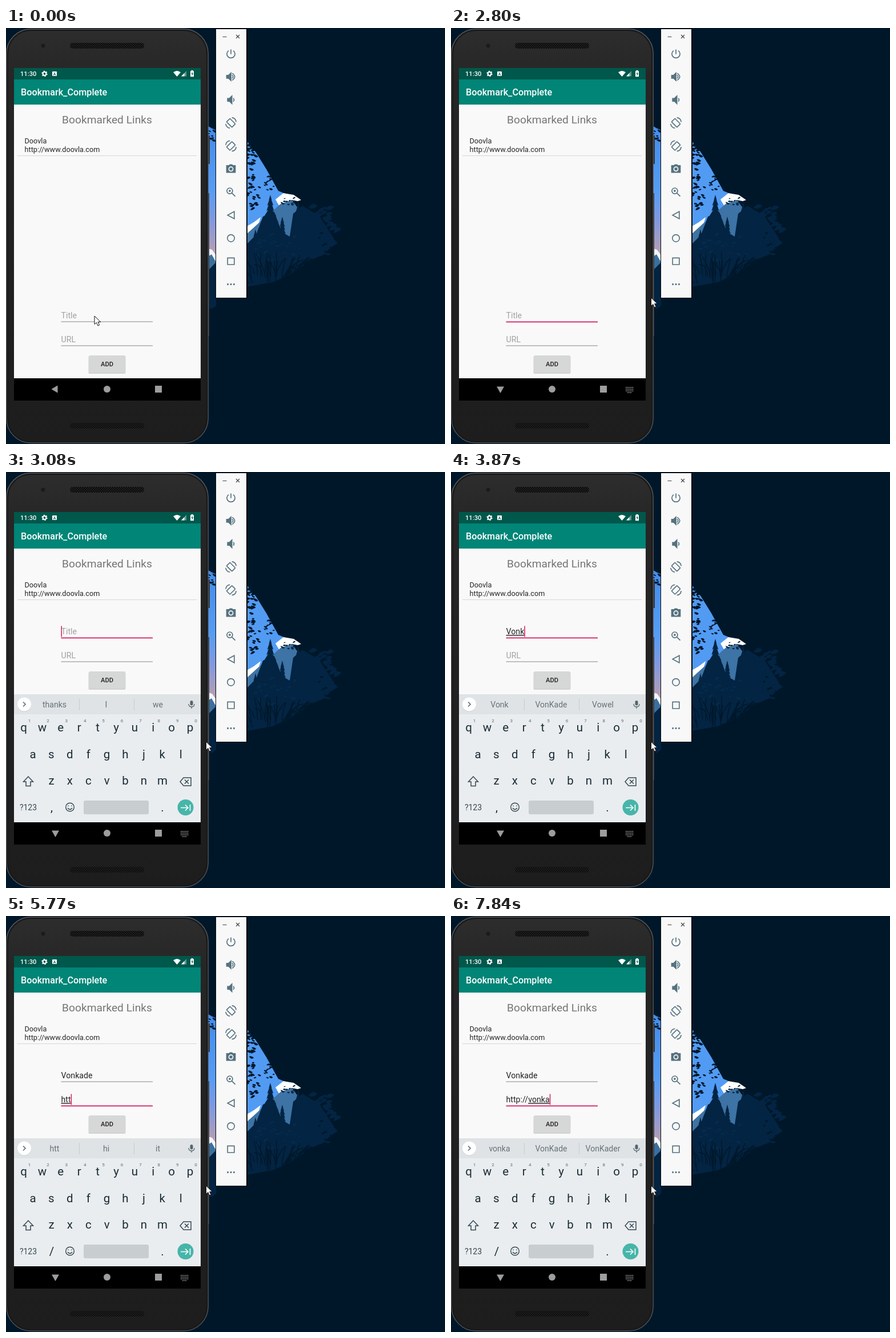
An HTML page for the animation above (7.99 s loop, 769 px wide and 728 px high).

```html
<!DOCTYPE html>
<html lang="en">
<head>
<meta charset="utf-8">
<title>Bookmark app demo</title>
<style>
  html, body { margin: 0; width: 100%; height: 100%; overflow: hidden; background: #00172a; }
  svg { display: block; width: 100vw; height: 100vh; }
  text { font-family: Roboto, "Noto Sans", sans-serif; white-space: pre; }
  .mid { text-anchor: middle; }
  .bold { font-weight: 500; }
  .field { font-size: 14.2px; }
  .under { text-decoration: underline; text-decoration-thickness: 1px; }
  .key { font-size: 20.5px; fill: #1c2b33; text-anchor: middle; }
  .digit { font-size: 8px; fill: #5d6a71; text-anchor: middle; }
  .word { font-size: 14px; fill: #677177; text-anchor: middle; }
  .line { fill: none; stroke: #56727f; stroke-width: 1.7; }
</style>
</head>
<body>
<svg viewBox="0 0 769 728" preserveAspectRatio="none">
  <defs>
    <linearGradient id="dusk" x2="0" y2="1">
      <stop offset="0" stop-color="#438ceb"/><stop offset=".5" stop-color="#579df5"/>
      <stop offset=".72" stop-color="#8199df"/><stop offset="1" stop-color="#bb9fae"/>
    </linearGradient>
    <linearGradient id="shell" x2="0" y2="1">
      <stop offset="0" stop-color="#2d2d2d"/><stop offset=".12" stop-color="#262626"/><stop offset="1" stop-color="#1d1d1d"/>
    </linearGradient>
    <pattern id="mesh" width="4" height="4" patternUnits="userSpaceOnUse">
      <path d="M0 0h2v2H0zM2 2h2v2H2z" fill="#0b0b0b"/>
    </pattern>
    <clipPath id="imeClip"><path d="M14 389h327v224H14z"/></clipPath>
  </defs>
  <rect width="769" height="728" fill="#00172a"/>
  <g id="scenery"></g>

  <!-- emulator toolbar -->
  <path d="M367 1h56v472h-56z" fill="#060a0e"/>
  <path d="M368 2h53v470h-53z" fill="#f8f8f8"/>
  <path class="line" style="stroke:#444;stroke-width:1.2" d="M379.500 15.500h7M403 12l6 6m0-6l-6 6"/>
  <g id="tools"></g>

  <!-- phone -->
  <path d="M353 188h4v50h-4zM353 289h3v250h-3z" fill="#343638"/>
  <rect x=".7" y="1.700" width="353.500" height="724.500" rx="43" fill="url(#shell)" stroke="#5a5c5e" stroke-width="1.200"/>
  <rect x="3" y="4" width="349" height="720" rx="41" fill="none" stroke="#191919" stroke-width="2"/>
  <circle cx="65" cy="31" r="3.500" fill="#1b1b1d"/>
  <g id="grills"></g>
  <path d="M14 70h327v20H14z" fill="#00574b"/>
  <path d="M14 90h327v44H14z" fill="#008577"/>
  <path d="M14 134h327v479H14z" fill="#f9f9f9"/>
  <path d="M14 613h327v39H14z"/>
  <g fill="#fff">
    <text class="bold" x="25" y="84" font-size="11.200">11:30</text>
    <circle cx="67.500" cy="80" r="2.900" fill="none" stroke="#fff" stroke-width="2"/>
    <circle cx="67.500" cy="80" r="4.500" fill="none" stroke="#fff" stroke-width="1.400" stroke-dasharray="2.300 2.410"/>
    <rect x="81" y="76" width="8" height="8" rx="1"/>
    <text class="mid bold" x="85" y="82.500" font-size="7" style="fill:#00574b">A</text>
    <path d="M293 77.500q6.500-5 13 0l-6.500 7.500z"/>
    <path d="M316 75v9.500h-9z" opacity=".4"/><path d="M312.500 79v5.500H307z"/>
    <path d="M324.500 74h3v1.200h1.500v10h-6v-10h1.500z"/>
    <path d="M326.500 76.500l-2 4h1.500v3l2-4h-1.500z" fill="#00574b"/>
    <text class="bold" x="26" y="118" font-size="16.200">Bookmark_Complete</text>
  </g>
  <text class="mid" x="177" y="167" font-size="19.200" fill="#757575">Bookmarked Links</text>
  <g font-size="12.700" fill="#252525">
    <text x="32.500" y="202">Doovla</text>
    <text x="32.500" y="217">http://www.doovla.com</text>
  </g>
  <path d="M20 223h314v1H20z" fill="#d6d6d6"/>

  <g id="form">
    <g id="fields"></g>
    <path id="caret" fill="#d81b60"/>
    <rect x="144.500" y="574" width="65" height="31" rx="2" fill="#bcbdbd" opacity=".65"/>
    <rect x="145" y="573" width="64" height="30" rx="2" fill="#d6d7d7"/>
    <text class="mid bold" x="177" y="592" font-size="11.200" fill="#202020">ADD</text>
  </g>

  <g clip-path="url(#imeClip)"><g id="ime">
    <path d="M14 389h327v224H14z" fill="#e9edf0"/>
    <path d="M14 389h327v35H14z" fill="#dfe3e6"/>
    <path d="M128 397h1v20h-1zM224 397h1v20h-1z" fill="#c6cbce"/>
    <circle cx="32" cy="407.500" r="12" fill="#cdd1d4"/>
    <circle cx="32" cy="406.500" r="12" fill="#fff"/>
    <path class="line" d="M30 402.500l4 4-4 4"/>
    <rect x="322.500" y="400" width="5" height="8.500" rx="2.500" fill="#56656c"/>
    <path class="line" style="stroke:#56656c;stroke-width:1.300" d="M320 406q0 5 5 5t5-5M325 411v3"/>
    <g id="keys"></g>
    <path id="shift" class="line" style="stroke:#37474f;stroke-width:1.500" d="M39 533l-8.500 9h4.500v7.500h8V542h4.500z"/>
    <path class="line" style="stroke:#37474f;stroke-width:1.500" d="M311 535h13v14h-13l-6-7zM313 538.500l7 7m0-7l-7 7"/>
    <text class="mid" x="39" y="592" font-size="14" fill="#37474f">?123</text>
    <g class="line" style="stroke:#37474f;stroke-width:1.400">
      <circle cx="112" cy="586.500" r="7.300"/><path d="M108 588q4 5 8 0M109 583.500v1.500M115 583.500v1.500"/>
    </g>
    <rect x="136" y="575" width="114" height="24" rx="3" fill="#c8cdd0"/>
    <circle cx="314.500" cy="587" r="14" fill="#47b5a9"/>
    <path d="M306 587.500h13m-5-5l5 5-5 5M322.500 582v11" fill="none" stroke="#fff" stroke-width="1.600"/>
  </g></g>

  <g fill="#9d9d9d">
    <path id="back"/>
    <circle cx="177" cy="632" r="6"/>
    <path d="M261 626h12v12h-12z"/>
    <path id="imeIcon" d="M306 629h14M306 632h14M306 635h14M309 638h8" stroke="#9d9d9d" stroke-width="1.700" stroke-dasharray="1.700 1"/>
  </g>
  <path id="mouse" d="M0 0v14.500l3.500-3 2.500 5.500 2.600-1.200-2.500-5.300h4.600z" fill="#fff" stroke="#111"/>
</svg>

<script>
const LOOP = 7990;
const $ = id => document.getElementById(id);

// seeded randomness for the wallpaper
let seed = 11;
const rnd = (a, b) => a + (b - a) * ((seed = seed * 16807 % 2147483647) / 2147483647);
const shape = (d, fill) => `<path d="${d}" fill="${fill}"/>`;

function leaves(n, cx, cy, rx, ry, size, fill) {
  let d = "";
  for (let i = 0; i < n; i++) {
    const a = rnd(0, 6.283), r = Math.sqrt(rnd(0, 1)), s = rnd(size / 2, size);
    const x = cx + rx * r * Math.cos(a), y = cy + ry * r * Math.sin(a), k = rnd(-s, s);
    d += `M${x - s} ${y}q${s} ${-s + k} ${2 * s} ${k}q${-s} ${s} ${-2 * s} ${-k}z`;
  }
  return shape(d, fill);
}

function pine(x, top, h, w, fill) {
  let left = "", right = "";
  for (let i = 1; i <= 9; i++) {
    const y = top + h * i / 9, r = w * i / 9 * rnd(.8, 1.1);
    right += `L${x + r} ${y}L${x + r * .55} ${y - 2}`;
    left = `L${x - r * .55} ${y - 2}L${x - r} ${y}` + left;
  }
  return shape(`M${x} ${top}${right}${left}z`, fill);
}

function grass() {
  let d = "";
  for (let i = 0; i < 45; i++) {
    const x = rnd(424, 515), lean = (x - 465) * .6 + rnd(-14, 14);
    d += `M${x} ${rnd(430, 448)}q${lean * .2} -22 ${lean} ${-rnd(20, 45)}`;
  }
  return `<path d="${d}" fill="none" stroke="#00172a" stroke-width="1.3"/>`;
}

const NIGHT = "#00172a", WOOD = "#032442";
$("scenery").innerHTML =
  shape("M354 172l14 7v221h-14z", "url(#dusk)") +
  shape("M422 198l16 20 18 29 21 38 24 10-20 25-41 25-18 12z", "#529bf3") +
  shape("M354 386l7 2 7 10v24l-14-6z", "#f4f6fa") +
  shape("M354 400l6-4 8 14v22h-14z", "#3b709f") +
  shape("M354 424l14-14v76l-8 6-6-4z", WOOD) +
  shape("M472 300l14-11 18 3 13 9-6 2-11-2-6 12-12 4z", "#fff") +
  shape("M422 347l12-7 12-9-3 10-9 10-12 13z", "#fff") +
  shape("M422 360l20-18 40-35 20-5 14 20 2 50-96 10z", "#3d73a5") +
  shape("M422 378l16-16 12-32 20-8 13 35 14 8 6-40 16-14 30 18 30 46-18 20-30 12-24 20-40 18-45 8z", WOOD) +
  leaves(55, 545, 355, 40, 46, 8, WOOD) +
  pine(463, 292, 85, 24, WOOD) + pine(437, 352, 60, 17, WOOD) +
  pine(512, 304, 80, 19, WOOD) + pine(484, 330, 55, 14, WOOD) +
  leaves(22, 478, 385, 45, 25, 6, "#052a4c") + grass() +
  leaves(24, 430, 222, 9, 24, 5, NIGHT) + leaves(30, 434, 285, 12, 38, 4.5, NIGHT) +
  leaves(14, 461, 275, 12, 18, 4, NIGHT) + leaves(14, 361, 183, 7, 15, 4, NIGHT) +
  leaves(14, 498, 303, 18, 7, 3, WOOD) + leaves(14, 565, 378, 24, 24, 5, NIGHT) +
  leaves(10, 361, 478, 6, 14, 4, WOOD);

// toolbar icons, each on a 24-unit grid
const speaker = "M3 9v6h4l5 5V4L7 9z";
const turned = `<rect x="7" y="4" width="10" height="16" rx="1" transform="rotate(-45 12 12)"/>
  <path d="M14 1q8 1 9 9M10 23q-8-1-9-9"/>`;
const icons = [
  `<path d="M12 3v10M7 5.500a8.500 8.500 0 1 0 10 0"/>`,
  `<path d="${speaker}" fill="#56727f"/><path d="M14.500 8.500q4 3.500 0 7M14.500 4.500q11 7.500 0 15"/>`,
  `<path d="${speaker}" fill="#56727f" transform="translate(2)"/><path d="M17 8.500q3 3.500 0 7"/>`,
  turned,
  `<g transform="matrix(-1 0 0 1 24 0)">${turned}</g>`,
  `<path d="M3 5h5l2-2h4l2 2h5v14H3z" fill="#56727f"/><circle cx="12" cy="12" r="4.300" style="stroke:#f8f8f8"/>`,
  `<circle cx="9.500" cy="9.500" r="6"/><path d="M14 14l7 7M9.500 7v5M7 9.500h5"/>`,
  `<path d="M19 4.500v15L5 12z"/>`,
  `<circle cx="12" cy="12" r="7.500"/>`,
  `<path d="M5 5h14v14H5z"/>`,
  `<path d="M4 12h3M10.500 12h3M17 12h3" stroke-width="3.500"/>`
];
$("tools").innerHTML = icons.map((icon, i) =>
  `<g class="line" style="stroke-width:2" transform="translate(384 ${35 + 40.35 * i}) scale(.835)">${icon}</g>`).join("");

$("grills").innerHTML = [26, 691].map(y =>
  `<rect x="112" y="${y}" width="130" height="10" rx="5" fill="#202020"/>
   <rect x="112" y="${y}" width="130" height="10" rx="5" fill="url(#mesh)"/>`).join("");

// form fields
const fields = [["Title", 508], ["URL", 550]].map(([hint, y]) => {
  $("fields").insertAdjacentHTML("beforeend",
    `<g><text class="field" x="96.500" y="${y}"><tspan></tspan><tspan class="under"></tspan></text><path/></g>`);
  const group = $("fields").lastChild, text = group.firstChild;
  return { hint, y, text, plain: text.firstChild, draft: text.lastChild, rule: group.lastChild };
});

// keyboard letters and suggestions
let keyMarkup = "";
["qwertyuiop", "asdfghjkl", "zxcvbnm"].forEach((row, r) => [...row].forEach((c, i) => {
  const x = [31, 47, 79.5][r] + 32.4 * i;
  keyMarkup += `<text class="key letter" x="${x}" y="${454 + 46.7 * r}">${c}</text>`;
  if (!r) keyMarkup += `<text class="digit" x="${x + 10}" y="438">${(i + 1) % 10}</text>`;
}));
keyMarkup += `<text class="key" id="slash" x="80" y="594"></text><text class="key" x="274" y="594">.</text>`;
keyMarkup += [85, 175.5, 266].map(x => `<text class="word" x="${x}" y="412"></text>`).join("");
$("keys").innerHTML = keyMarkup;
const letters = [...document.querySelectorAll(".letter")];
const words = [...document.querySelectorAll(".word")];

// each step changes part of the state; text is "finished|being composed"
const type = (key, text, hints) => ({ [key]: text, caret: true, ...(hints && { hints }) });
const steps = [
  [0, { mouse: [155, 504], focus: -1, caret: false, title: "|", url: "|", nav: false, ime: null, caps: false, slash: ",", hints: "thanks I we" }],
  [1400, { mouse: [226, 491] }],
  [1520, { mouse: [222, 493] }],
  [1670, { mouse: [188, 503] }],
  [1940, { focus: 0, caret: true }],
  [2090, { mouse: [311, 470] }],
  [2240, { mouse: [350.5, 472] }],
  [2800, { caret: false, nav: true }],
  [2930, { caret: true, ime: 90 }],
  [3080, { ime: 0 }],
  [3360, { caps: true }],
  [3480, { caps: false, ...type("title", "|V", "V Very Via") }],
  [3600, type("title", "|Vo", "Vo Vote Voice")],
  [3720, type("title", "|Von", "Von Voice Vow")],
  [3870, type("title", "|Vonk", "Vonk VonKade Vowel")],
  [3990, type("title", "|Vonkad", "Vonkad VonKade VonKader")],
  [4130, type("title", "|Vonkade", "Vonkade VonKade VonKader")],
  [4700, { title: "Vonkade|", focus: 1, caret: true }],
  [4850, { slash: "/", hints: "thanks I we" }],
  [5250, { caret: false }],
  [5500, type("url", "|h", "h hi he")],
  [5650, type("url", "|ht", "ht hi it")],
  [5770, type("url", "|htt", "htt hi it")],
  [6040, type("url", "|http", "http hello https")],
  [6440, type("url", "http:|", "the I to")],
  [6590, type("url", "http:/|", "a I to")],
  [6710, type("url", "http://|")],
  [7270, { caret: false }],
  [7420, type("url", "http://|v", "v very via")],
  [7570, type("url", "http://|vo", "vo very via")],
  [7720, type("url", "http://|von", "von voice vowel")],
  [7840, type("url", "http://|vonka", "vonka VonKade VonKader")]
];

function drawField(field, value, focused, caret) {
  const [plain, draft] = value.split("|"), empty = !plain && !draft;
  field.plain.textContent = empty ? field.hint : plain;
  field.draft.textContent = draft;
  field.text.setAttribute("fill", empty ? "#a2a2a2" : "#242424");
  field.rule.setAttribute("d", `M96.500 ${field.y + 5.5}h160.500v${focused ? 1.7 : 1}h-160.500z`);
  field.rule.setAttribute("fill", focused ? "#d81b60" : "#858585");
  if (focused && caret) {
    const x = 96.5 + (empty ? 0 : field.text.getComputedTextLength());
    $("caret").setAttribute("d", `M${x} ${field.y - 14.5}h1.500v19h-1.500z`);
  }
}

function render(t) {
  const s = Object.assign({}, ...steps.filter(step => step[0] <= t).map(step => step[1]));
  const open = s.ime !== null;
  $("mouse").setAttribute("transform", `translate(${s.mouse})`);
  $("form").setAttribute("transform", `translate(0 ${open ? -224 : 0})`);
  $("ime").setAttribute("transform", `translate(0 ${open ? s.ime : 300})`);
  $("caret").setAttribute("d", "");
  [s.title, s.url].forEach((value, i) => drawField(fields[i], value, s.focus === i, s.caret));
  letters.forEach(k => k.textContent = s.caps ? k.textContent.toUpperCase() : k.textContent.toLowerCase());
  $("shift").style.fill = s.caps ? "#37474f" : "none";
  $("slash").textContent = s.slash;
  s.hints.split(" ").forEach((word, i) => words[i].textContent = word);
  $("back").setAttribute("d", s.nav ? "M80 627.500h13l-6.500 11.500z" : "M90.500 625.500v13L79.500 632z");
  $("imeIcon").style.display = s.nav ? "" : "none";
}

function tick() {
  render(performance.now() % LOOP);
  requestAnimationFrame(tick);
}
tick();
</script>
</body>
</html>
```
